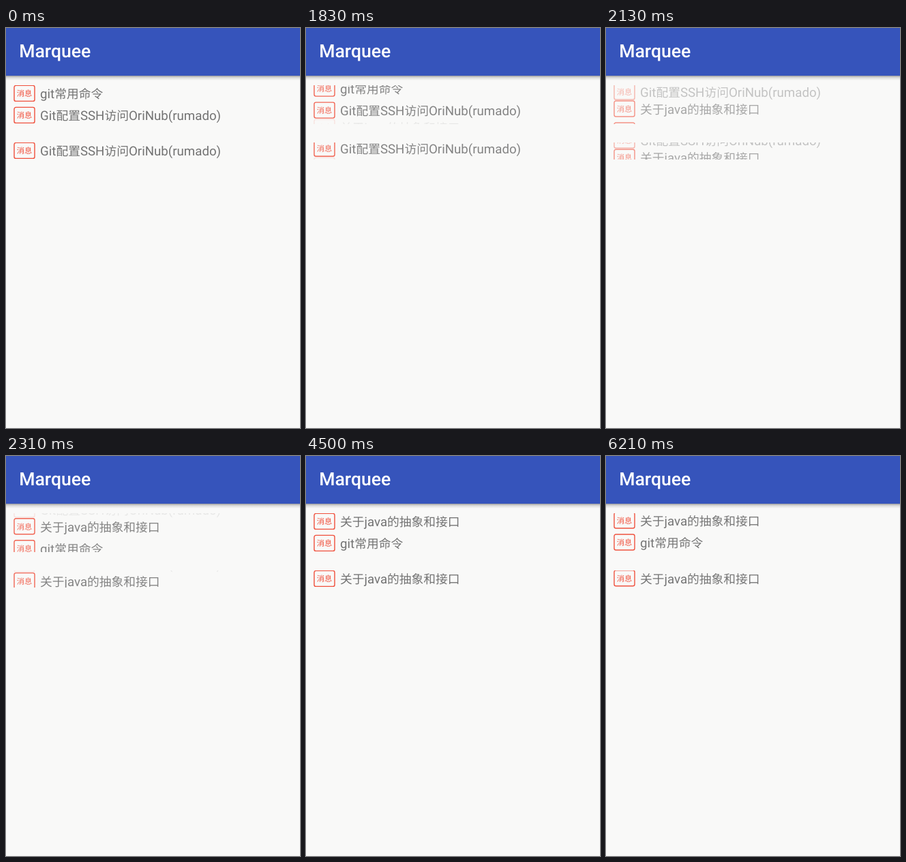
These frames come from a looping animation (431x587 px, 6240 ms). An HTML page:

```html
<!DOCTYPE html>
<html lang="zh-CN">
<head>
<meta charset="utf-8">
<title>Marquee</title>
<style>
  html, body { margin: 0; width: 100%; height: 100%; overflow: hidden; background: #f9f9f8; }
  svg { display: block; overflow: hidden; }
  text { font: 18.7px Roboto, "Noto Sans CJK SC", "Noto Sans CJK", sans-serif; fill: #737373; text-rendering: geometricPrecision; }
  .han { font-size: 17.75px; }
  .title { font-size: 26.6px; font-weight: 500; fill: #fff; }
  .tag { font-size: 11.3px; fill: #f0503c; }
  .badge { fill: none; stroke: #f0503c; stroke-width: 1.4; }
</style>
</head>
<body>
<svg id="stage" width="431" height="587">
  <defs>
    <linearGradient id="shade" x2="0" y2="1">
      <stop offset="0" stop-color="#000" stop-opacity=".36"/>
      <stop offset=".4" stop-color="#000" stop-opacity=".12"/>
      <stop offset="1" stop-color="#000" stop-opacity="0"/>
    </linearGradient>
  </defs>
  <rect width="431" height="70" fill="#3654bb"/>
  <rect y="70" width="431" height="7" fill="url(#shade)"/>
  <text class="title" x="19.2" y="43">Marquee</text>
</svg>
<script>
const LOOP = 6240, STEP = 30, STARTS = [1620, 6120], DURATION = 900, PITCH = 32;
const stage = document.getElementById('stage');
const news = ['git常用命令', 'Git配置SSH访问OriNub(rumado)', '关于java的抽象和接口'];

// Chinese glyphs are set slightly smaller than the Latin ones
const mixed = s => s.replace(/[一-龥]+/g, '<tspan class="han">$&</tspan>');

const row = (s, i) => `<g transform="translate(0 ${i * PITCH})">
  <rect class="badge" x="12" y=".4" width="30" height="23" rx="2.5"/>
  <text class="tag" x="15.7" y="16.4">消息</text>
  <text x="50" y="19.4">${mixed(s)}</text></g>`;

function addView(y, height, pages) {
  const view = document.createElementNS('http://www.w3.org/2000/svg', 'svg');
  view.setAttribute('y', y);
  view.setAttribute('width', 431);
  view.setAttribute('height', height);
  view.innerHTML = pages.map(p => `<g>${p.map((n, i) => row(news[n], i)).join('')}</g>`).join('');
  stage.append(view);
  return { height, pages: [...view.children] };
}

const views = [
  addView(84, 57, [[0, 1], [2, 0], [1, 2]]),
  addView(168, 25, [[1], [2], [0]])
];

function progress(t, start) {
  const x = Math.min(1, Math.max(0, (t - start) / DURATION));
  return (1 - Math.cos(Math.PI * x)) / 2;
}

function draw(now) {
  const time = now % LOOP, t = time - time % STEP;
  const scroll = STARTS.reduce((sum, s) => sum + progress(t, s), 0);
  for (const { height, pages } of views) {
    pages.forEach((page, i) => {
      const d = i - scroll;
      page.setAttribute('transform', `translate(0 ${d * height})`);
      page.setAttribute('opacity', Math.max(0, 1 - Math.abs(d)));
    });
  }
}

const began = performance.now();
function tick() {
  draw(performance.now() - began);
  requestAnimationFrame(tick);
}
tick();
</script>
</body>
</html>
```
